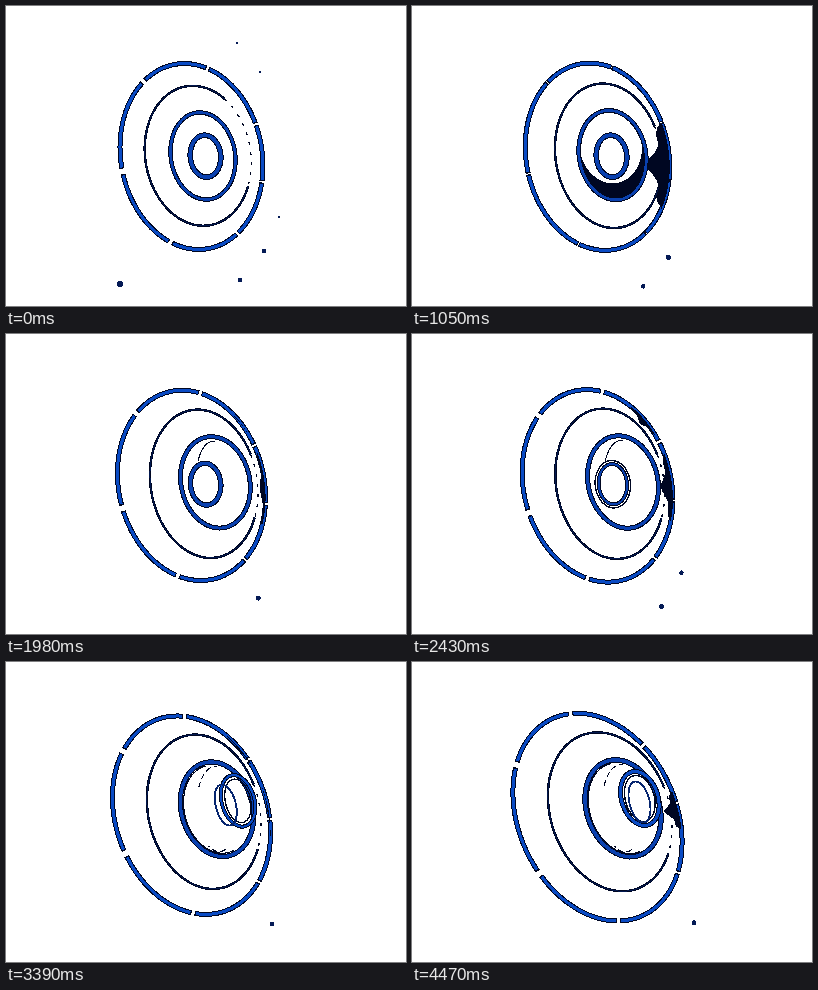
Write an HTML page that moves like this. It is 400 px wide and 300 px high and loops after 4500 ms.

```html
<!DOCTYPE html>
<html lang="en">
<head>
<meta charset="utf-8">
<title>Rings</title>
<style>
html, body { margin: 0; width: 100%; height: 100%; overflow: hidden; background: #fff; }
svg { display: block; width: 100vw; height: 100vh; }
</style>
</head>
<body>
<svg id="stage" viewBox="0 0 400 300" shape-rendering="crispEdges"></svg>
<script>
const LOOP = 4500, STEP = 30;
const DARK = '#000722', BLUE = '#0a4bc4', DEEP = '#0a41b0', NAVY = '#06256f';
const stage = document.getElementById('stage');

const mix = (a, b, k) => a + (b - a) * k;
const ramp = (t, from, to) => Math.min(1, Math.max(0, (t - from) / (to - from)));
const ease = (t, from, to) => { const k = ramp(t, from, to); return k * k * (3 - 2 * k); };
const bell = (t, mid, width) => Math.exp(-(((t - mid) / width) ** 2));

// ellipse sheared by lean
const ring = (x, y, w, h, lean) => ({ x, y, w, h, lean, phi: Math.asin(lean) });

const inset = (r, d) => ring(r.x, r.y, r.w - d, r.h - d, r.lean);

function point(r, deg) {
  const a = deg * Math.PI / 180;
  const x = r.x + r.w * Math.cos(a), y = r.y + r.h * Math.sin(a + r.phi);
  return x.toFixed(2) + ' ' + y.toFixed(2);
}

function arc(r, from = 0, to = 360) {
  const n = Math.max(2, Math.ceil((to - from) / 4)), pts = [];
  for (let i = 0; i <= n; i++) pts.push(point(r, mix(from, to, i / n)));
  return 'M' + pts.join('L') + (to - from === 360 ? 'Z' : '');
}

const line = (d, width, color, dash = '') =>
  `<path d="${d}" fill="none" stroke="${color}" stroke-width="${width.toFixed(2)}" stroke-dasharray="${dash}"/>`;
const fill = (d, color) => `<path d="${d}" fill="${color}"/>`;
const tube = (d, width, color = BLUE) => line(d, width, DARK) + line(d, Math.max(.6, width - 2), color);

// dark shadow hugging the inside of a ring
function shade(r, from, to, depth) {
  if (depth < .5) return '';
  const outer = [], inner = [];
  for (let i = 0; i <= 24; i++) {
    const s = i / 24, deg = mix(from, to, s);
    const bump = Math.sin(Math.PI * s) ** .7 * (.8 + .25 * Math.cos(4 * Math.PI * s));
    outer.push(point(r, deg));
    inner.unshift(point(inset(r, depth * bump), deg));
  }
  return fill('M' + outer.concat(inner).join('L') + 'Z', DARK);
}

// segments whose gaps turn slowly backwards and are wider on the near side
function outerRing(t, r, turn) {
  let out = tube(arc(r), 5);
  for (const deg of [10, 50, 107, 165, 228, 283, 334]) {
    const mid = deg - 32 * turn;
    const near = 1.1 - .6 * Math.cos(mid * Math.PI / 180);
    const half = near * (1 - .8 * bell(t, 1050, 280));
    out += line(arc(r, mid - half - .8, mid + half + .8), 4.8, DARK) +
      line(arc(r, mid - half, mid + half), 7, '#fff');
  }
  return out;
}

function wideRing(t, r) {
  const from = 20, to = mix(300, 330, ease(t, 0, 1000));
  return tube(arc(r, from, to), 2.5, NAVY) + line(arc(r, to, from + 360), 1.3, DARK, '3 7');
}

function midRing(t, r, u) {
  let out = '';
  const dip = 11 * bell(t, 1050, 300);
  if (dip > .4) {
    const light = ring(r.x - dip * .2, r.y - dip, r.w - 1 - dip * .1, r.h - dip * .5, .08);
    out += fill(arc(r), DARK) + fill(arc(light), '#fff');
  }
  out += tube(arc(r), 4.5 + u, DEEP);
  if (t > 2600) out += line(arc(inset(r, 3.2), 60, 250), 1.2, DARK);
  if (t > 1300) {
    const thin = ring(r.x, r.y, r.w * .55, r.h * .9, .1);
    out += line(arc(thin, 205, 270), 1.1, DARK, t < 2700 ? '' : '6 3');
    if (t > 2700) out += line(arc(thin, 65, 115), 1.1, DARK, '6 3');
  }
  return out;
}

// the first centre ring thins out while a second one swings in from the right
function core(t) {
  let out = '';
  if (t < 3300) {
    const thin = ease(t, 1800, 3000);
    const r = ring(199.5 + 2.5 * thin, 150.2, 15.3 - 2 * thin, 21 - 1.5 * thin, .06);
    out += tube(arc(r), 5.6 - 3.2 * thin, DEEP);
    if (t > 2200 && t < 2700) out += line(arc(inset(r, -3.5)), 1.4, DARK);
  }
  if (t > 2650) {
    const p = ramp(t, 2650, 3840), q = ease(t, 2650, 3840);
    const swing = 14 * Math.sin(Math.PI * Math.sqrt(q));
    const r = ring(mix(218, 227.8, q) + swing, mix(144, 136.5, q), mix(13, 19.3, q), mix(23, 27, q), .25);
    const eye = ring(mix(207, 227.5, p), mix(148, 140, p), 11, 20.5, .35);
    if (t > 3300) out += line(arc(inset(r, 4)), 1.4, DARK);
    out += tube(arc(r), mix(2, 5, q)) + line(arc(eye), 1.9, NAVY);
  }
  return out;
}

// specks fall with one shared acceleration and drift sideways
const SPECKS = [
  { x: 258, y: 245, drift: -1.45, from: 0, to: 3240, r: 2.5 },
  { x: 234, y: 274, drift: -2.5, from: 0, to: 1350, r: 2.3 },
  { x: 273, y: 211, drift: -.6, from: 0, to: 700, r: .9 },
  { x: 273, y: 211, drift: -.6, from: 2300, to: 4100, r: 2.3 },
  { x: 294, y: 175, drift: -.6, from: 3800, to: LOOP, r: 2.5 },
  { x: 114, y: 278, drift: -7, from: 0, to: 420, r: 3 },
  { x: 231, y: 37, drift: 0, from: 0, to: 600, r: 1 },
  { x: 254, y: 66, drift: 0, from: 0, to: 600, r: 1.1 }
];

function specks(t) {
  const s = t / 1000, fall = 2 * s + 3.85 * s * s;
  return SPECKS.filter(p => t >= p.from && t < p.to).map(p =>
    `<circle cx="${p.x + p.drift * s * s}" cy="${p.y + fall}" r="${p.r}" fill="#041a55"/>`).join('');
}

function draw(t) {
  const u = t / LOOP, k = u * u, shift = ease(t, 400, 2400);
  const outer = ring(185.5, mix(150.5, 155.2, k), mix(71.5, 84.8, k), mix(93, 104, k), mix(.1, .24, k));
  const wide = ring(192 + 6 * ease(t, 0, 1600), 149.8, 53.3 + 9 * u ** 3, mix(70, 79.5, u), mix(.1, .2, k));
  const mid = ring(197 + 14 * shift, mix(150, 146.3, u), mix(32.5, 38, u), mix(43.5, 48.5, u), .1 + .1 * k);

  const right = 23 * bell(t, 1050, 300) + 11 * bell(t, 2500, 600) + 14 * ease(t, 3500, LOOP);
  stage.innerHTML = outerRing(t, outer, k) +
    shade(outer, -28, mix(38, -7, u), right) +
    shade(outer, -64, -40, 9 * bell(t, 2750, 500)) +
    wideRing(t, wide) + midRing(t, mid, u) + core(t) + specks(t);
}

const start = performance.now();
function tick() {
  const t = (performance.now() - start) % LOOP;
  draw(Math.floor(t / STEP) * STEP);
  requestAnimationFrame(tick);
}
tick();
</script>
</body>
</html>
```
